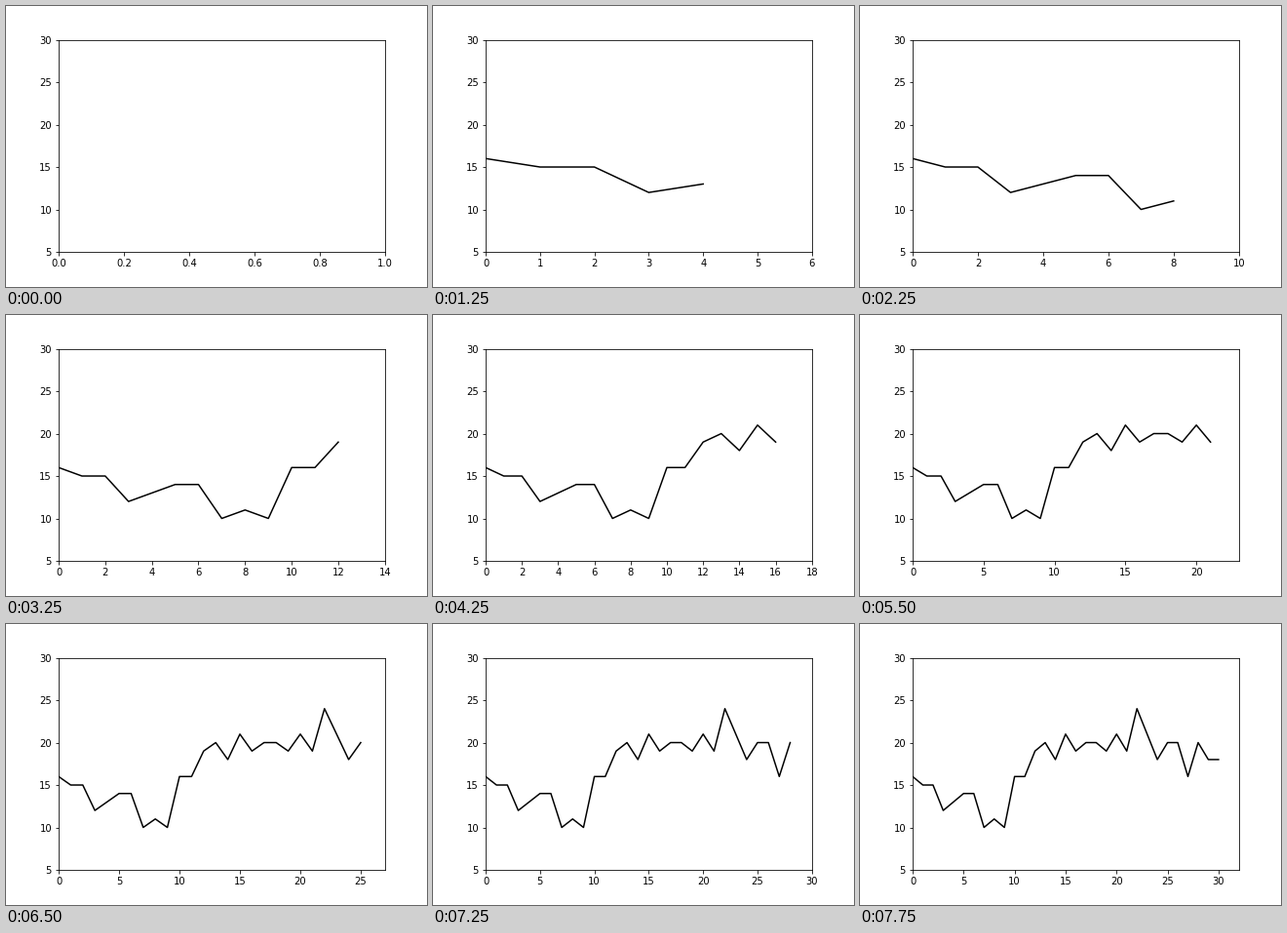
A matplotlib script for the animation above (8 s loop, 432 by 288 pixels).

```python
import matplotlib.pyplot as plt
import numpy as np
from matplotlib.animation import FuncAnimation

FRAMES = 32
STEP_MS = 250

# Key points (x, level) of the trend
TREND = [(0, 15.6), (2, 14.6), (3, 12), (6, 14.4), (7, 9.9), (9, 10.9),
         (10, 15), (12, 19.1), (21, 20.1), (22, 23.2), (24, 19), (25, 19),
         (26, 20.9), (27, 15.7), (28, 19.9), (30, 17.1)]
WAVE_START, WAVE_SIZE, WAVE_PERIOD = 7, 1.2, 2.5


def make_series(count):
    """Whole-number readings: a trend that picks up a regular wobble."""
    x = np.arange(count)
    wave = WAVE_SIZE * np.cos(2 * np.pi * x / WAVE_PERIOD)
    level = np.interp(x, *zip(*TREND))
    return x, np.round(level + wave * (x >= WAVE_START))


plt.rcParams["font.family"] = "DejaVu Sans"

fig, ax = plt.subplots(figsize=(6, 4), dpi=72, facecolor="white")
fig.subplots_adjust(left=0.125, right=0.9, bottom=0.125, top=0.88)
ax.set_ylim(5, 30)
line, = ax.plot([], [], color="black", linewidth=1.5)
xs, ys = make_series(FRAMES - 1)


def draw(count):
    """Show the first `count` readings and widen the x axis to fit them."""
    line.set_data(xs[:count], ys[:count])
    ax.set_xlim(0, count + 1)
    return line,


def reset():
    return draw(0)


anim = FuncAnimation(fig, draw, frames=FRAMES, init_func=reset,
                     interval=STEP_MS, repeat=True, repeat_delay=0)

plt.show()
```
